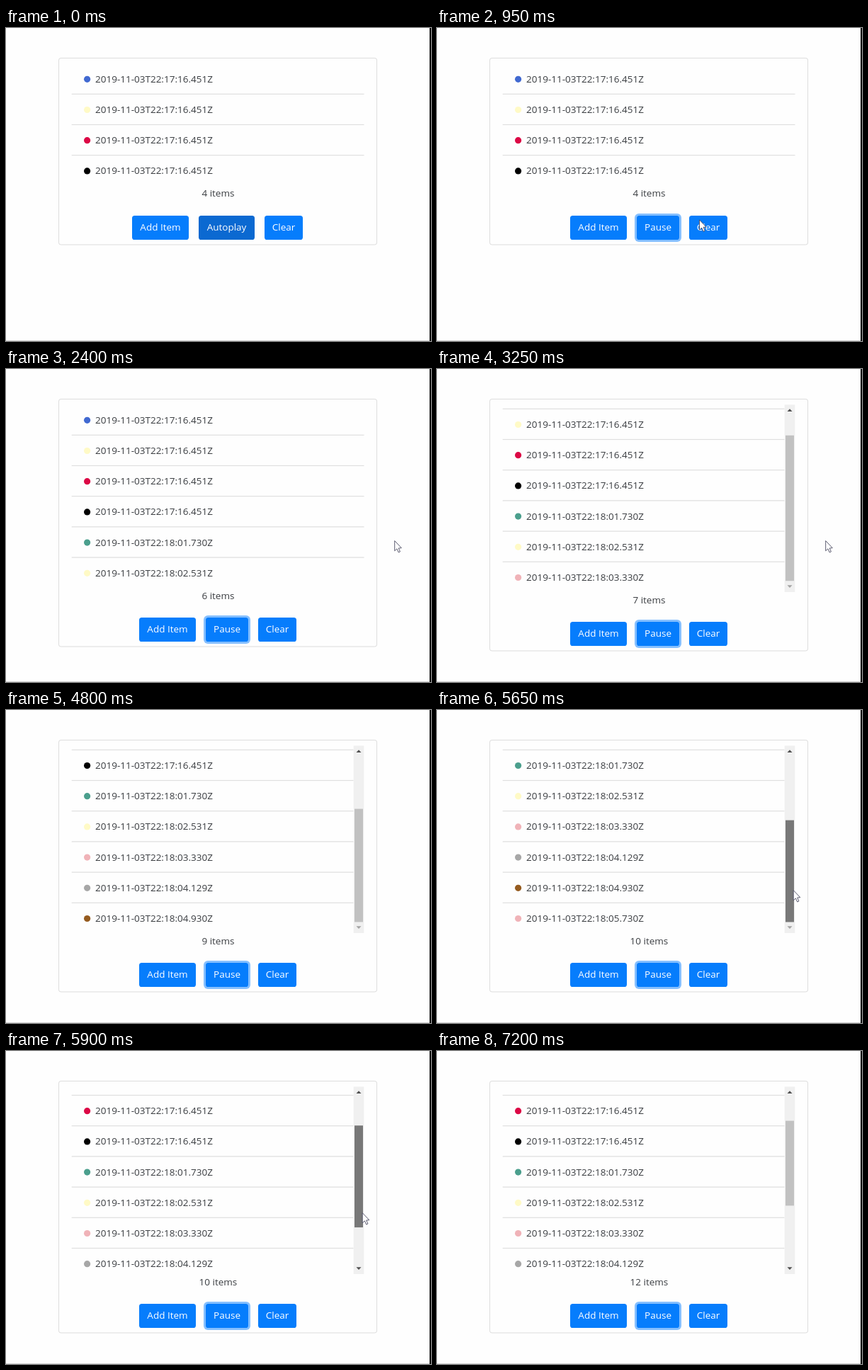
Animation of 600 by 442 pixels, one loop 8 s. Source, as an HTML page with a canvas:

```html
<!DOCTYPE html>
<html lang="en">
<head>
<meta charset="utf-8">
<title>Autoplay list</title>
<style>
  html, body { margin: 0; width: 100%; height: 100%; overflow: hidden; background: #fefefe; }
  canvas { display: block; }
</style>
</head>
<body>
<canvas id="stage" width="600" height="442"></canvas>
<script>
const ctx = document.getElementById('stage').getContext('2d');
const LOOP = 8000, STEP = 50;
const CLICK = 800, INTERVAL = 800;
const DRAG = { press: 5450, start: 5650, end: 5900, scroll: 74 };
const FONT = '13.5px "Open Sans", "Noto Sans", sans-serif';
const INK = '#3a3d41', BLUE = '#067dfc', BLUE_HOVER = '#0b69d1';
const TOP = 50.4, ROW = 43.2, MAX_HEIGHT = 265.4;
const CENTER = 299, GAP = 14;

const items = [
  ...['#4169d1', '#fffac6', '#dc0745', '#000000'].map(color => [color, '17:16.451']),
  ['#4b9f8d', '18:01.730'],
  ['#fffac6', '18:02.531'],
  ['#f0b3b8', '18:03.330'],
  ['#a7a7a7', '18:04.129'],
  ['#955b1f', '18:04.930'],
  ['#f0b3b8', '18:05.730']
];

// Cursor key points: time, x, y.
const leaveButton = [[CLICK, 312, 274], [1300, 582, 257], [1650, 548.5, 242]];
const dragThumb = [[5100, 532, 243], [DRAG.press, 503, 254], [DRAG.start, 503, 254],
  [DRAG.end, 503, 228], [6200, 570, 250]];

const clamp = v => Math.min(1, Math.max(0, v));
const mix = (a, b, k) => a + (b - a) * k;
const smooth = k => k * k * (3 - 2 * k);
const easeOut = k => 1 - (1 - k) ** 2;

function along(points, t) {
  const next = points.findIndex(p => p[0] > t);
  if (next < 0) return points.at(-1).slice(1);
  const [t0, x0, y0] = points[next - 1], [t1, x1, y1] = points[next];
  const k = smooth((t - t0) / (t1 - t0));
  return [mix(x0, x1, k), mix(y0, y1, k)];
}

function cursorAt(t) {
  if (t >= CLICK && t < 4300) return along(leaveButton, t);
  if (t >= 5100 && t < 6200) return along(dragThumb, t);
}

function box(x, y, w, h, r, fill) {
  ctx.beginPath();
  ctx.roundRect(x, y, w, h, r);
  ctx.fillStyle = fill;
  ctx.fill();
}

function rect(x, y, w, h, fill) {
  ctx.fillStyle = fill;
  ctx.fillRect(x, y, w, h);
}

function text(str, x, y, color, align = 'left') {
  ctx.fillStyle = color;
  ctx.textAlign = align;
  ctx.fillText(str, x, y);
}

function shape(points, fill) {
  ctx.beginPath();
  points.forEach(([x, y]) => ctx.lineTo(x, y));
  ctx.closePath();
  ctx.fillStyle = fill;
  ctx.fill();
}

function drawRows(count, scroll, right, height) {
  ctx.save();
  ctx.beginPath();
  ctx.rect(92, TOP, 414, height);
  ctx.clip();
  items.slice(0, count).forEach(([color, time], i) => {
    const y = 72.1 + ROW * i - scroll;
    ctx.beginPath();
    ctx.arc(114.6, y + 0.2, 4.6, 0, Math.PI * 2);
    ctx.fillStyle = color;
    ctx.fill();
    text(`2019-11-03T22:${time}Z`, 126, y + 4.6, INK);
    if (i < count - 1) rect(92.7, y + 20.6, right - 92.7, 1.2, '#dfdfdf');
  });
  ctx.restore();
}

function drawScrollbar(count, scroll, maxScroll, thumbColor) {
  const scale = 235 / (count * ROW);
  const arrow = (y, tip, color) => shape([[494.5, y], [501.5, y], [498, tip]], color);
  rect(490.7, TOP, 14.6, 264.6, '#f0f0f0');
  rect(492, 65 + scroll * scale, 12, 264.4 * scale, thumbColor);
  arrow(60, 56.3, '#505050');
  arrow(305.2, 308.9, scroll < maxScroll ? '#505050' : '#a3a3a3');
}

function drawButtons(y, playing, hover) {
  const buttons = [['Add Item', 80], playing ? ['Pause', 60] : ['Autoplay', 79], ['Clear', 54]];
  const total = buttons.reduce((sum, [, w]) => sum + w, GAP * 2);
  let x = Math.floor(CENTER - total / 2);
  buttons.forEach(([label, w], i) => {
    const toggle = i === 1;
    if (toggle && playing) box(x - 3, y - 3, w + 6, 40, 6, '#85bffe');
    box(x, y, w, 34, 3.6, toggle && hover ? BLUE_HOVER : BLUE);
    text(label, x + w / 2, y + 21.4, '#ffffff', 'center');
    x += w + GAP;
  });
}

function drawCursor([x, y]) {
  const outline = [[0, 0], [0, 14.2], [3.2, 11.3], [5.5, 16.4], [7.7, 15.4], [5.5, 10.4], [9.6, 10.1]];
  shape(outline.map(([dx, dy]) => [x + 0.2 + dx, y + 0.6 + dy]), '#ffffff');
  ctx.strokeStyle = '#4a4a60';
  ctx.lineWidth = 0.9;
  ctx.stroke();
}

function draw(t) {
  const count = 4 + Math.max(0, Math.floor((t - CLICK) / INTERVAL));
  const height = Math.min(count * ROW, MAX_HEIGHT);
  const bottom = TOP + height;
  const buttonY = Math.round(bottom + 41.5);
  const maxScroll = count * ROW - height;
  const pulled = easeOut(clamp((t - DRAG.start) / (DRAG.end - DRAG.start)));
  const scroll = pulled ? mix(10 * ROW - MAX_HEIGHT, DRAG.scroll, pulled) : maxScroll;
  const cursor = cursorAt(t);

  ctx.font = FONT;
  rect(0, 0, 600, 442, '#fefefe');
  rect(0, 441, 600, 1, '#d4d4d4');
  rect(598, 0, 2, 442, '#000000');

  box(74, 42, 450, buttonY - 0.5, 4, '#dedede');
  box(75, 43, 448, buttonY - 2.5, 3, '#fefefe');
  drawRows(count, scroll, maxScroll ? 490.7 : 505.5, height);
  if (maxScroll) {
    const dragging = t >= DRAG.press && t <= DRAG.end;
    drawScrollbar(count, scroll, maxScroll, dragging ? '#787878' : '#c1c1c1');
  }
  text(`${count} items`, 299.4, bottom + 14.9, INK, 'center');
  drawButtons(buttonY, t >= CLICK, t < CLICK + 100);
  if (cursor) drawCursor(cursor);
}

const start = performance.now();
function tick() {
  const t = (performance.now() - start) % LOOP;
  draw(Math.floor(t / STEP) * STEP);
  requestAnimationFrame(tick);
}
tick();
</script>
</body>
</html>
```
